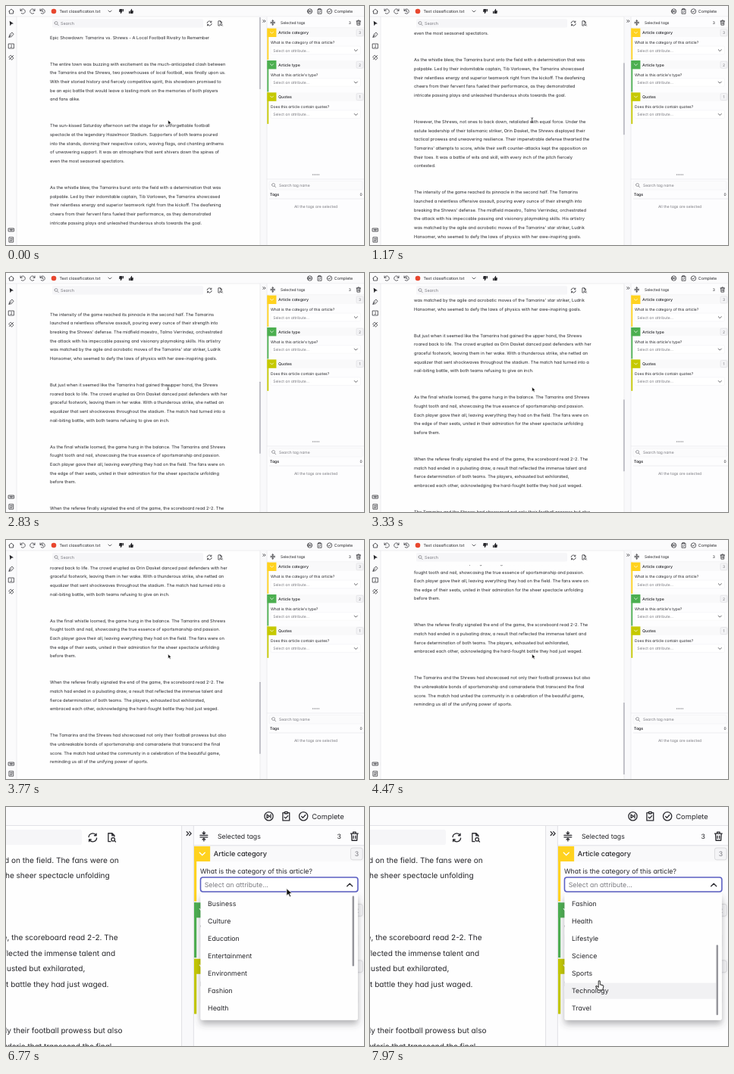
An HTML page that plays this animation: 472 px wide and 316 px high, repeating every 8000 ms.

```html
<!DOCTYPE html>
<html lang="en">
<head>
<meta charset="utf-8">
<title>Text classification</title>
<style>
html, body { margin: 0; width: 100%; height: 100%; overflow: hidden; background: #fefefe; }
svg { display: block; width: 472px; height: 316px; }
text {
  font-family: Inter, sans-serif; font-size: 5px; fill: #26262a;
  font-feature-settings: "cv11"; text-rendering: geometricPrecision;
}
.body { font-size: 5.73px; }
.bar { font-size: 5.35px; }
.tag { font-size: 5.2px; font-weight: 500; }
.hint { fill: #7a7a80; }
.bold { font-weight: 600; }
.mid { text-anchor: middle; }
.icon { fill: none; stroke: #2b2b30; stroke-width: .75; stroke-linecap: round; stroke-linejoin: round; }
.solid { fill: #26262a; stroke: none; }
.white { stroke: #fff; }
.faint { stroke: #85858a; }
.rule { stroke: #e2e2e6; stroke-width: .6; }
</style>
</head>
<body>
<svg viewBox="0 0 472 316">
  <defs>
    <clipPath id="pageClip"><rect x="15" y="33" width="319" height="283"/></clipPath>
    <clipPath id="listClip"><rect x="349" y="65" width="118.5" height="95.5"/></clipPath>
    <filter id="shadow" x="-20%" y="-20%" width="140%" height="140%">
      <feDropShadow dx="0" dy="3" stdDeviation="2.5" flood-color="#44444c" flood-opacity=".4"/>
    </filter>
  </defs>
  <g id="camera"></g>
</svg>
<script>
const LOOP = 8000, WIDTH = 472, ZOOM = 1.755;
const LINE_STEP = 11.66, FIRST_LINE = 42, MAX_SCROLL = 573;
const $ = id => document.getElementById(id);

const article = `Epic Showdown: Tamarins vs. Shrews - A Local Football Rivalry to Remember


The entire town was buzzing with excitement as the much-anticipated clash between
the Tamarins and the Shrews, two powerhouses of local football, was finally upon us.
With their storied history and fiercely competitive spirit, this showdown promised to
be an epic battle that would leave a lasting mark on the memories of both players
and fans alike.


The sun-kissed Saturday afternoon set the stage for an unforgettable football
spectacle at the legendary Hazelmoor Stadium. Supporters of both teams poured
into the stands, donning their respective colors, waving flags, and chanting anthems
of unwavering support. It was an atmosphere that sent shivers down the spines of
even the most seasoned spectators.


As the whistle blew, the Tamarins burst onto the field with a determination that was
palpable. Led by their indomitable captain, Tib Varlowen, the Tamarins showcased
their relentless energy and superior teamwork right from the kickoff. The deafening
cheers from their fervent fans fueled their performance, as they demonstrated
intricate passing plays and unleashed thunderous shots towards the goal.


However, the Shrews, not ones to back down, retaliated with equal force. Under the
astute leadership of their talismanic striker, Orin Dasket, the Shrews displayed their
tactical prowess and unwavering resilience. Their impenetrable defense thwarted the
Tamarins' attempts to score, while their swift counter-attacks kept the opposition on
their toes. It was a battle of wits and skill, with every inch of the pitch fiercely
contested.


The intensity of the game reached its pinnacle in the second half. The Tamarins
launched a relentless offensive assault, pouring every ounce of their strength into
breaking the Shrews' defense. The midfield maestro, Talmo Verrindez, orchestrated
the attack with his impeccable passing and visionary playmaking skills. His artistry
was matched by the agile and acrobatic moves of the Tamarins' star striker, Ludrik
Hansomer, who seemed to defy the laws of physics with her awe-inspiring goals.


But just when it seemed like the Tamarins had gained the upper hand, the Shrews
roared back to life. The crowd erupted as Orin Dasket danced past defenders with her
graceful footwork, leaving them in her wake. With a thunderous strike, she netted an
equalizer that sent shockwaves throughout the stadium. The match had turned into a
nail-biting battle, with both teams refusing to give an inch.


As the final whistle loomed, the game hung in the balance. The Tamarins and Shrews
fought tooth and nail, showcasing the true essence of sportsmanship and passion.
Each player gave their all, leaving everything they had on the field. The fans were on
the edge of their seats, united in their admiration for the sheer spectacle unfolding
before them.


When the referee finally signaled the end of the game, the scoreboard read 2-2. The
match had ended in a pulsating draw, a result that reflected the immense talent and
fierce determination of both teams. The players, exhausted but exhilarated,
embraced each other, acknowledging the hard-fought battle they had just waged.


The Tamarins and the Shrews had showcased not only their football prowess but also
the unbreakable bonds of sportsmanship and camaraderie that transcend the final
score. The match had united the community in a celebration of the beautiful game,
reminding us all of the unifying power of sports.`.split("\n");

const options = ["Business", "Culture", "Education", "Entertainment", "Environment", "Fashion",
  "Health", "Lifestyle", "Science", "Sports", "Technology", "Travel"];
const ROW = 13.1, LIST_TOP = 66, LIST_SCROLL = 65;

const text = (x, centerY, content, cls = "") =>
  `<text x="${x}" y="${centerY + 1.85}" class="${cls}">${content}</text>`;
const rect = (x, y, w, h, fill, extra = "") =>
  `<rect x="${x}" y="${y}" width="${w}" height="${h}" fill="${fill}" ${extra}/>`;
const icon = (x, y, d, cls = "", id = "") =>
  `<path id="${id}" class="icon ${cls}" transform="translate(${x} ${y})" d="${d}"/>`;
const rule = (x1, y1, x2, y2) => `<path class="rule" d="M${x1} ${y1}L${x2} ${y2}"/>`;

const shapes = {
  chevron: "M-2 -1L0 1L2 -1",
  chevronUp: "M-2 1L0 -1L2 1",
  ring: "M-3.2 0a3.2 3.2 0 1 0 6.4 0a3.2 3.2 0 1 0 -6.4 0",
  undo: "M-3 -3V-.7H-.7M-2.8 -.9A3.1 3.1 0 1 1 -1.8 2.5",
  redo: "M3 -3V-.7H.7M2.8 -.9A3.1 3.1 0 1 0 1.8 2.5",
  thumb: "M-3 -.3H-1.5V3H-3ZM-1 -.4L.4 -3.2Q1.5 -3.2 1.2 -.8H3L2.4 3H-1Z",
  lens: "M-2.5 -.5a2 2 0 1 0 4 0a2 2 0 1 0 -4 0M1 1L2.8 2.8",
  cycle: "M-3 -.4A3 3 0 0 1 2.5 -1.7M2.7 -3V-1.5H1.2M3 .4A3 3 0 0 1 -2.5 1.7M-2.7 3V1.5H-1.2",
  file: "M-.5 3H-2.3V-3.2H.6L2.3 -1.5V-.8M.5 -3V-1.4H2.2M0 1.4a1.3 1.3 0 1 0 2.6 0a1.3 1.3 0 1 0 -2.6 0M2.3 2.3L3.2 3.2",
  clipboard: "M-1 -2.7H-2.5V3.2H2.5V-2.7H1M-1 -3.4H1V-2H-1ZM-1.2 .7L-.3 1.5L1.3 -.4",
  trash: "M-2.8 -2H2.8M-1 -2V-3.1H1V-2M-2.2 -2L-1.9 3.2H1.9L2.2 -2M-.8 -.3V1.7M.8 -.3V1.7",
  fold: "M-2.8 -.7H2.8M-2.8 .7H2.8M0 -3.6V-1.6M-1 -2.5L0 -1.6L1 -2.5M0 3.6V1.6M-1 2.5L0 1.6L1 2.5"
};

function tagCard(y, color, name, count, question, chevronId) {
  return rect(344.4, y, 127.6, 11.4, "#f9f9fa") +
    rect(344.4, y, 1.8, 41.5, color) + rect(344.4, y, 12, 11.4, color) +
    icon(350.5, y + 5.7, shapes.chevron, "white") +
    text(359.1, y + 5.7, name, "tag") +
    rect(462, y + 1.2, 9, 9, "#f4f4f6", 'rx="1.5" stroke="#d6d6da" stroke-width=".5"') +
    text(466.5, y + 5.7, count, "mid hint") +
    text(348.9, y + 18.9, question) +
    rect(349.2, y + 23.4, 118.2, 10.8, "#fff", 'rx="1.5" stroke="#efeff2" stroke-width=".5"') +
    text(352.2, y + 29.1, "Select an attribute...", "hint") +
    icon(461.3, y + 29.1, shapes.chevron, "", chevronId);
}

const page = rect(0, 0, WIDTH, 316, "#fefefe") +
  `<g clip-path="url(#pageClip)"><g id="article">` +
  article.map((line, i) => text(58, FIRST_LINE + i * LINE_STEP, line, "body")).join("") +
  `</g></g>`;

const toolbar = rect(0, 0, WIDTH, 14, "#fbfbfc") + rect(0, 14, 14, 302, "#fbfbfc") +
  rule(0, 14, WIDTH, 14) + rule(14, 14, 14, 316) +
  icon(7, 7, "M-3.3 0L0 -3L3.3 0M-2.5 -.5V3H2.5V-.5") +
  icon(22, 7, shapes.undo) + icon(35, 7, shapes.redo) +
  icon(48, 7, shapes.undo + "M0 -1.5V.3L1.2 1") +
  `<circle cx="63" cy="7" r="3.3" fill="#e8472f"/>` +
  text(70.5, 7, "Text classification.txt", "bar") + icon(137, 7, shapes.chevron) +
  `<g transform="translate(152 7) rotate(180)">${icon(0, 0, shapes.thumb, "solid")}</g>` +
  icon(165, 7, shapes.thumb, "solid") +
  icon(400.5, 7, shapes.ring + "M-1.4 -1.3L.6 0L-1.4 1.3ZM1.4 -1.3V1.3") +
  icon(413.5, 7, shapes.clipboard) +
  icon(426.5, 7, shapes.ring + "M-1.4 .1L-.4 1.1L1.5 -1") + text(432.8, 7, "Complete", "bar") +
  icon(7, 23, "M-2.3 -3.3L3 .3L.2 .8L-1.6 3.2Z", "solid") +
  icon(7, 38, "M-3 3L-2 -.5L1 -3L3 -.8L.6 2.2ZM-3 3L0 0") +
  icon(7, 53, "M-3.4 -3H3.4V3H-3.4Z") + text(7, 53, "2", "mid") +
  icon(7, 68, "M-3 -.8L-.8 -3L3 .8L.8 3ZM-2.6 2.6L2.6 -2.6") +
  icon(7, 296, "M-3.5 -2H3.5V2H-3.5ZM-2 -.6H2M-1.3 .8H1.3") +
  icon(7, 309, "M-2.7 -3.2H2.7V3.2H-2.7ZM-1.3 -1.3H1.3M-1.3 .2H1.3M-1.3 1.7H.4") +
  rect(61, 17, 199, 11.5, "#f6f6f8", 'rx="1.5"') +
  icon(66.5, 23, shapes.lens, "faint") + text(72, 23, "Search", "bar hint") +
  icon(268.2, 23, shapes.cycle) + icon(282.2, 23, shapes.file);

const panel = rect(335, 14.3, 137, 302, "#fdfdfe") + rect(335, 14.3, 9, 302, "#f9f9fb") +
  rule(335, 14, 335, 316) + rule(344, 14, 344, 316) +
  `<rect id="thumb" x="334.4" width="1.1" height="95" fill="#9a9aa6" rx=".5"/>` +
  icon(340.4, 20, "M-1.6 -1.4L-.2 0L-1.6 1.4M.4 -1.4L1.8 0L.4 1.4") +
  icon(351.7, 22, shapes.fold) + text(362, 22, "Selected tags") +
  text(453.3, 22, "3", "mid") + icon(464.8, 22, shapes.trash) + rule(344, 29, WIDTH, 29) +
  tagCard(29.6, "#ffd21f", "Article category", 3, "What is the category of this article?", "selectChevron") +
  tagCard(72, "#4caf50", "Article type", 2, "What is this article's type?", "typeChevron") +
  tagCard(114.4, "#c5c900", "Quotes", 1, "Does this article contain quotes?", "quotesChevron") +
  [404.5, 406.5, 408.5, 410.5, 412.5].map(x => rect(x - .6, 222.4, 1.2, 1.2, "#85858a")).join("") +
  rule(344, 229, WIDTH, 229) +
  rect(347, 231.5, 123, 11.5, "#fbfbfc", 'rx="1.5" stroke="#ececf0" stroke-width=".5"') +
  icon(353, 237, shapes.lens, "faint") + text(360, 237, "Search tag name", "hint") +
  text(348, 249, "Tags", "bold") + text(468, 249, "0", "mid") + rule(347, 255, WIDTH, 255) +
  text(408.5, 265, "All the tags are selected", "mid hint");

const dropdown = `<rect id="focus" x="349.2" y="53" width="118.2" height="10.8" rx="1.8" fill="none"/>
  <g id="dropdown">
    ${rect(349.2, 65, 118.2, 95.5, "#fefefe", 'rx="1.5" filter="url(#shadow)"')}
    <g clip-path="url(#listClip)"><g id="list">
      <rect id="hover" x="349.2" width="114" height="12" fill="#f1f1f3"/>
      ${options.map((name, i) => text(354.7, LIST_TOP + (i + .5) * ROW, name)).join("")}
    </g></g>
    <rect id="listThumb" x="463.2" width="1.4" height="53" rx=".7" fill="#96969c"/>
  </g>`;

const pointer = `<g id="cursor">
  <path id="arrow" d="M0 0V5.6L1.4 4.4L2.4 6.5L3.4 6L2.4 4L4.2 3.9Z" fill="#111" stroke="#fff" stroke-width=".5"/>
  <path id="beam" class="icon" d="M-1 -3.2Q0 -3.2 0 -2.4Q0 -3.2 1 -3.2M0 -2.4V2.4M-1 3.2Q0 3.2 0 2.4Q0 3.2 1 3.2"/>
  <path id="hand" d="M-.6 -3Q0 -3.8 .6 -3V-.5L2.8 .1Q3.4 .4 3.1 1.4L2.5 3.6H-.9L-2.6 1.1Q-2.6 .2 -1.6 .7L-.6 1.5Z"
    fill="#fff" stroke="#333" stroke-width=".6" stroke-linejoin="round"/></g>`;

$("camera").innerHTML = page + toolbar + panel + dropdown + pointer;

const progress = (t, from, to) => Math.min(1, Math.max(0, (t - from) / (to - from)));
const ease = p => p * p * (3 - 2 * p);
const mix = (a, b, p) => a + (b - a) * p;
const show = (id, visible) => $(id).setAttribute("visibility", visible ? "inherit" : "hidden");
const set = (id, name, value) => $(id).setAttribute(name, value);

const scrollKeys = [[0, 0], [1170, 168.5], [2130, 279], [2830, 360], [3770, 483], [4600, MAX_SCROLL]];
function scrollAt(t) {
  const next = scrollKeys.findIndex(key => key[0] > t);
  if (next < 0) return MAX_SCROLL;
  const [t0, y0] = scrollKeys[next - 1], [t1, y1] = scrollKeys[next];
  return mix(y0, y1, progress(t, t0, t1));
}

function draw(t) {
  const scale = mix(1, ZOOM, ease(progress(t, 4970, 6630)));
  set("camera", "transform", `translate(${WIDTH * (1 - scale)} 0) scale(${scale})`);

  const scroll = scrollAt(t);
  set("article", "transform", `translate(0 ${-scroll})`);
  set("thumb", "y", 15 + 205 * scroll / MAX_SCROLL);

  const toSelect = ease(progress(t, 4750, 5650)), toList = ease(progress(t, 6900, 7450));
  const x = mix(mix(213.7, 413.8, toSelect), 375.3, toList);
  const y = mix(mix(151, 61.3, toSelect), 134.3, toList);
  set("cursor", "transform", `translate(${x} ${y})`);

  // The pointer turns into a text beam only while it lies on a long line.
  const line = (y - FIRST_LINE + scroll) / LINE_STEP, nearest = Math.round(line);
  const overText = x < 290 && Math.abs(line - nearest) * LINE_STEP < 2.8 &&
    (article[nearest] || "").length > 55;
  const open = t >= 6750, overList = open && y > 65;
  show("beam", overText);
  show("hand", overList);
  show("arrow", !overText && !overList);

  const hovered = x > 349 && y < 63.8;
  show("focus", open || hovered);
  set("focus", "stroke", open ? "#5c60c4" : "#8c8c96");
  set("focus", "stroke-width", open ? .9 : .6);
  set("selectChevron", "d", open ? shapes.chevronUp : shapes.chevron);
  show("dropdown", open);

  const listPart = ease(progress(t, 7430, 7930)), listScroll = LIST_SCROLL * listPart;
  const row = Math.floor((y + 1.5 - LIST_TOP + listScroll) / ROW);
  set("list", "transform", `translate(0 ${-listScroll})`);
  set("hover", "y", LIST_TOP + row * ROW + .5);
  show("hover", overList);
  set("listThumb", "y", mix(67, 103.8, listPart));
}

function frame() {
  draw(performance.now() % LOOP);
  requestAnimationFrame(frame);
}
frame();
</script>
</body>
</html>
```
